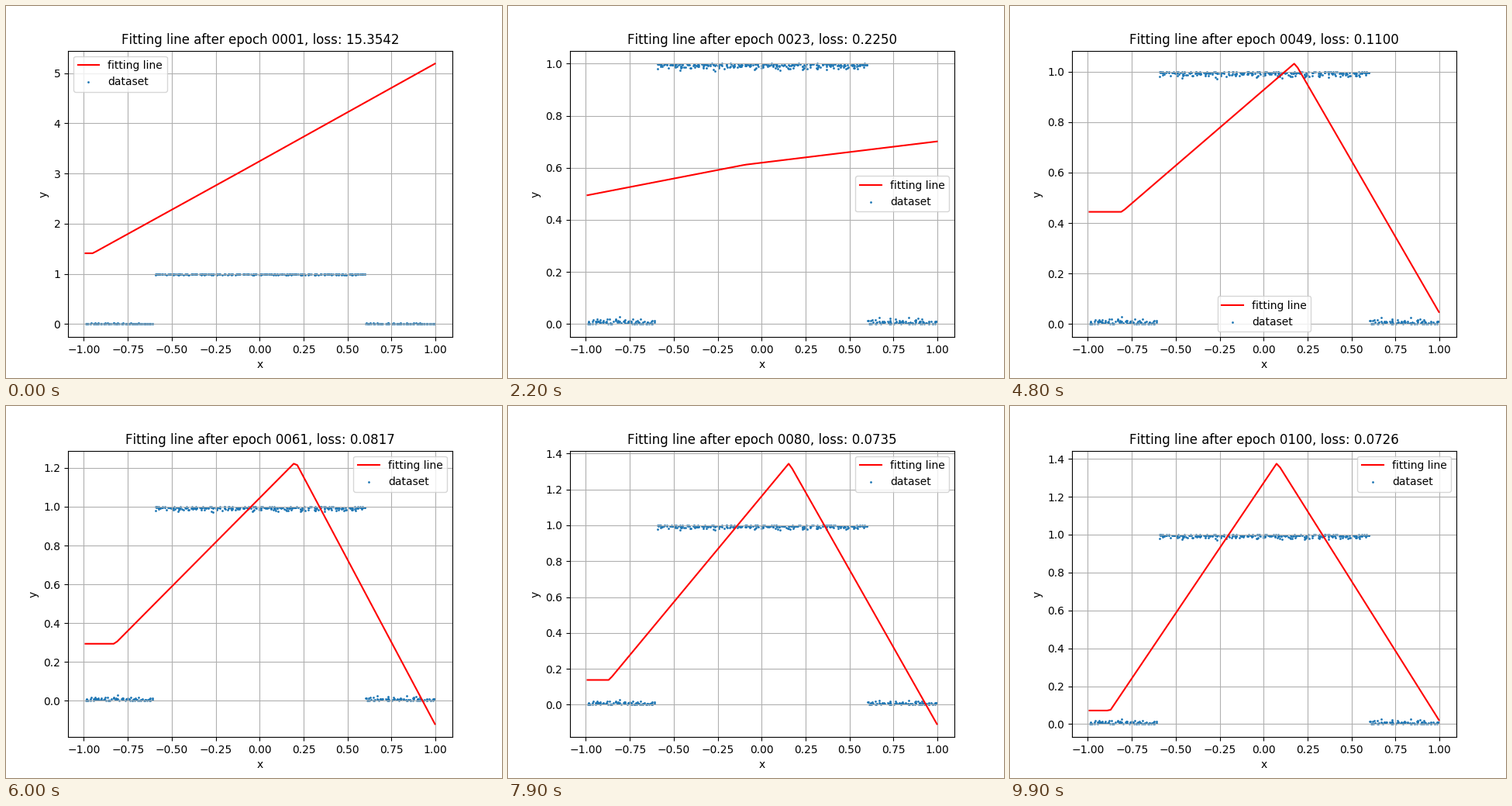
Animation of 640 by 480 pixels, one loop 10000 ms. Source, as a matplotlib script:

```python
import numpy as np
import matplotlib.pyplot as plt
from matplotlib.animation import FuncAnimation

plt.rcParams["text.kerning_factor"] = 6

EPOCHS = 100
X_MIN, X_MAX = -0.9907, 0.9967
DECAY = 0.72            # how fast the first guess is forgotten
FIRST_LOSS, FLOOR = 15.3542, 0.0724

# The curve is flat up to a knee, rises to a peak, then falls to the right end.
# Columns: knee x, knee y, peak x, peak y, end y
START = np.array([-0.949, 1.41, -0.1, 3.05, 5.187])
# Columns: epoch, then as above, then loss
POSES = np.array([
    (12, -1.000, 0.400, -0.140, 0.570, 0.740, 0.2400),
    (23, -0.990, 0.494, -0.094, 0.610, 0.698, 0.2250),
    (40, -0.866, 0.493, 0.095, 0.832, 0.283, 0.1531),
    (49, -0.806, 0.4445, 0.178, 1.034, 0.0476, 0.1100),
    (61, -0.823, 0.294, 0.204, 1.231, -0.1196, 0.0817),
    (80, -0.867, 0.138, 0.156, 1.346, -0.1077, 0.0735),
    (100, -0.873, 0.0715, 0.0766, 1.379, 0.0213, 0.0726)])

times, values = POSES[:, 0], POSES[:, 1:].copy()
values[:, -1] = np.log(values[:, -1] - FLOOR)
slopes = np.gradient(values, times, axis=0)


def pose(epoch):
    """Cubic Hermite curve through the key poses."""
    t = max(epoch, times[0])
    i = min(np.searchsorted(times, t, side="right") - 1, len(times) - 2)
    h = times[i + 1] - times[i]
    u = (t - times[i]) / h
    return (values[i] * (1 + 2 * u) * (1 - u) ** 2
            + values[i + 1] * u * u * (3 - 2 * u)
            + h * u * (1 - u) * (slopes[i] * (1 - u) - slopes[i + 1] * u))


def state(epoch):
    """Fitted y values and loss after the given epoch."""
    *shape, log_loss = pose(epoch)
    k = DECAY ** (epoch - 1)
    kx, ky, px, py, ey = shape + (START - values[0, :-1]) * k
    loss = FLOOR + np.exp(log_loss) + (FIRST_LOSS - POSES[0, -1]) * k * k
    return np.interp(grid_x, [kx, px, X_MAX], [ky, py, ey]), loss


def make_dataset(n=450):
    """Step function with one-sided noise."""
    rng = np.random.default_rng(7)
    x = np.linspace(X_MIN, X_MAX, n) + rng.normal(0, 0.01, n)
    x = np.clip(x, X_MIN, X_MAX)
    noise = np.minimum(np.abs(rng.normal(0, 0.01, n)), 0.031)
    return x, np.where(np.abs(x) < 0.598, 1 - noise, noise)


data_x, data_y = make_dataset()
grid_x = np.linspace(X_MIN, X_MAX, 100)
fig, ax = plt.subplots(figsize=(6.4, 4.8), dpi=100)


def draw(i):
    epoch = i + 1
    fit, loss = state(epoch)
    ax.clear()
    ax.plot(grid_x, fit, "r", label="fitting line")
    ax.scatter(data_x, data_y, s=1, label="dataset")
    ax.set_title(f"Fitting line after epoch {epoch:04d}, loss: {loss:.4f}")
    ax.set_xlabel("x")
    ax.set_ylabel("y")
    ax.grid(True)
    ax.legend(loc="best")
    return []


anim = FuncAnimation(fig, draw, frames=EPOCHS, interval=100,
                     init_func=lambda: [], repeat=True, repeat_delay=0)
plt.show()
```
